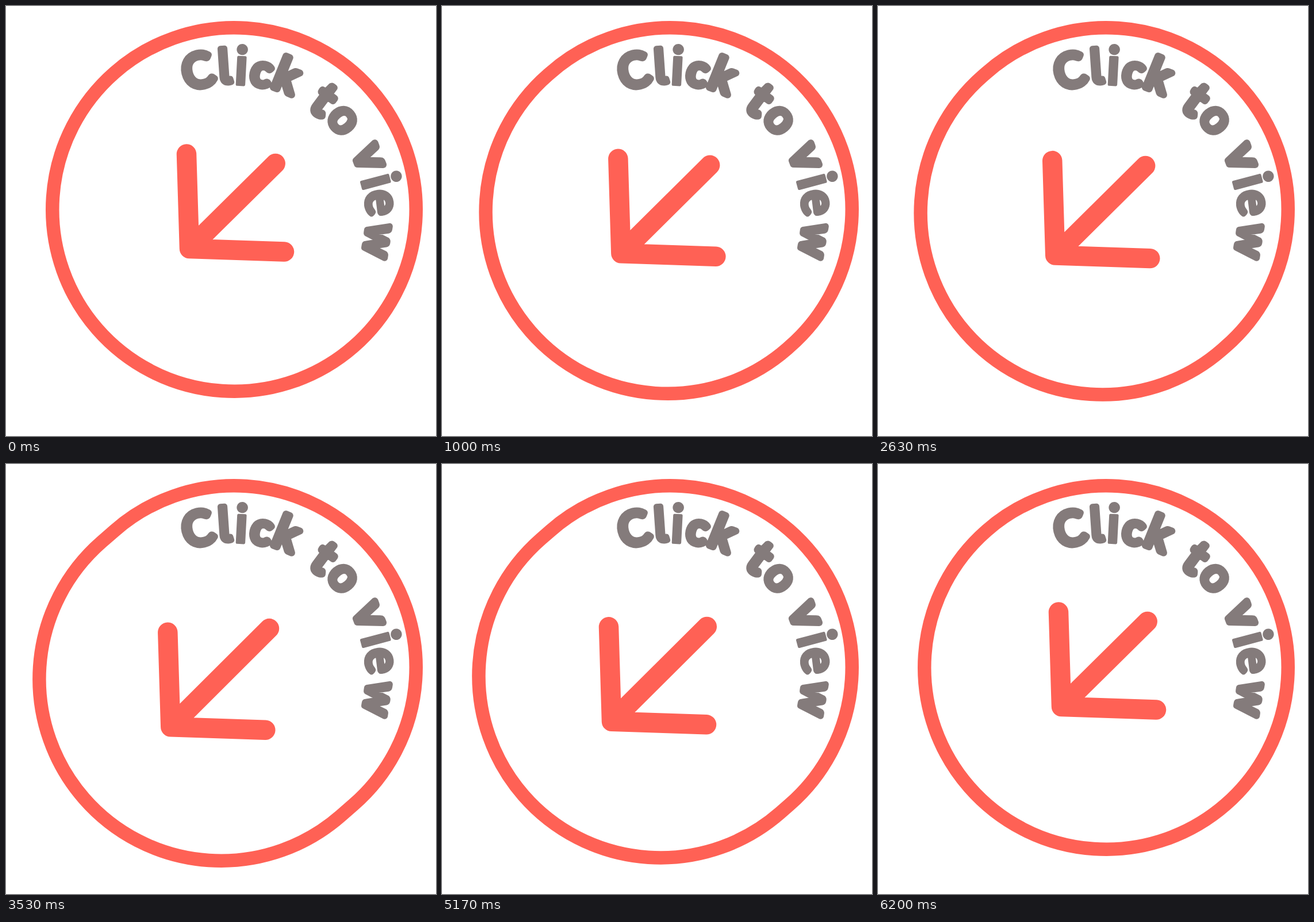
Animation, 748 px wide and 748 px high, one loop 6.63 s. Source, as an HTML page:

```html
<!DOCTYPE html>
<html lang="en">
<head>
<meta charset="utf-8">
<title>Click to view</title>
<style>
  html, body { margin: 0; width: 100%; height: 100%; overflow: hidden; background: #fff; }
  svg { display: block; width: 100%; height: 100%; }
  path { fill: none; stroke: #ff6155; stroke-linecap: round; stroke-linejoin: round; }
  text {
    font-family: Lato, Inter, sans-serif;
    text-anchor: middle;
    fill: #847b7b;
    stroke: #847b7b;
    stroke-linejoin: round;
  }
  .l { font-family: Inter, Lato, sans-serif; font-feature-settings: "cv05"; }
  .i { font-weight: 700; }
</style>
</head>
<body>
<svg viewBox="0 0 748 748">
  <path id="ring" stroke-width="23.5"/>
  <path id="arrow" stroke-width="34.5"/>
  <g id="label"></g>
</svg>
<script>
const $ = id => document.getElementById(id);

// letter, baseline centre x and y, rotation, font size, outline width
const letters = [
  ['C', 340.5, 140, -13.8, 80, 12],
  ['l', 382, 133.5, -4, 82, 10],
  ['i', 408, 136.5, 3, 92, 5],
  ['c', 440, 138, 11.6, 74, 12],
  ['k', 478.5, 147, 22, 80, 12],
  ['t', 537, 185.5, 37, 82, 12],
  ['o', 570, 212, 50, 78, 11],
  ['v', 610, 272, 69, 82, 12],
  ['i', 620, 312, 75, 92, 5],
  ['e', 628, 345, 83, 82, 9],
  ['w', 626, 405, 99, 74, 11]
];
$('label').innerHTML = letters.map(([ch, x, y, angle, size, width]) =>
  `<text class="${ch}" transform="translate(${x} ${y}) rotate(${angle})" ` +
  `font-size="${size}" stroke-width="${width}">${ch}</text>`).join('');

// cubic-bezier(.33, 0, x2, 1)
function ease(x, x2) {
  if (x <= 0 || x >= 1) return x <= 0 ? 0 : 1;
  let lo = 0, hi = 1, s;
  for (let i = 0; i < 24; i++) {
    s = (lo + hi) / 2;
    const r = 1 - s;
    if (3 * s * r * r * 0.33 + 3 * s * s * r * x2 + s * s * s < x) lo = s;
    else hi = s;
  }
  return s * s * (3 - 2 * s);
}

// Out for 16 ticks, back for 20, then rest
const stretch = (tick, x2) =>
  tick < 16 ? ease(tick / 16, x2) : 1 - ease((tick - 16) / 20, x2);

function draw(ms) {
  const tick = Math.floor((ms % 6630 + 4) * 0.03) % 50;

  // A radius just under half the chord makes each arc an exact half circle
  const p = stretch(tick, 0.38);
  const half = 'a316 316 0 0 1 ';
  $('ring').setAttribute('d',
    `M189 115.8${half}416 476.4l${-48.8 * p} ${42.6 * p}${half}-416 -476.4z`);

  const q = stretch(tick, 0.41);
  const x = 319 - 72.9 * q, y = 422 + 78.6 * q;
  $('arrow').setAttribute('d',
    `M${x - 5} ${y - 164.5}L${x} ${y}l165 5.5` +
    `M${x} ${y}L${468.7 - 24 * q} ${274 + 27 * q}`);
}

const start = performance.now();
function loop() {
  draw(performance.now() - start);
  requestAnimationFrame(loop);
}
loop();
</script>
</body>
</html>
```
